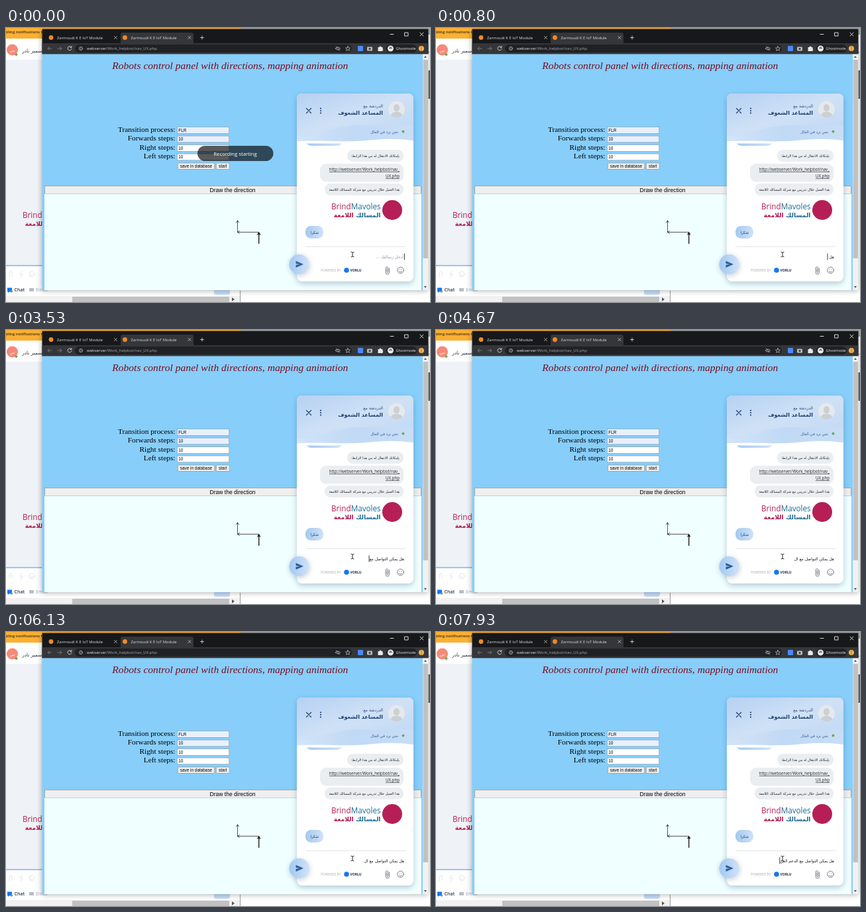
An HTML page for the animation above (8000 ms loop, 640x414 px).

```html
<!DOCTYPE html>
<html lang="en">
<head>
<meta charset="utf-8">
<title>Control panel with chat</title>
<style>
html, body { margin: 0; width: 100%; height: 100%; overflow: hidden; background: #fff; }
svg { display: block; width: 100%; height: 100%; }
text { font-family: "Open Sans", sans-serif; white-space: pre; }
.ar { font-family: "DejaVu Sans", sans-serif; direction: rtl; }
.serif { font-family: "Liberation Serif", serif; }
.arial { font-family: "Liberation Sans", sans-serif; }
.end { text-anchor: end; }
.mid { text-anchor: middle; }
.line { fill: none; stroke-linecap: round; stroke-linejoin: round; }
</style>
</head>
<body>
<svg viewBox="0 0 640 414" xmlns="http://www.w3.org/2000/svg">
<defs>
  <linearGradient id="head" x1="0" y1="0" x2="1" y2="1">
    <stop offset="0" stop-color="#b5d1f2"/><stop offset=".5" stop-color="#cfe1f6"/><stop offset="1" stop-color="#bfd8f4"/>
  </linearGradient>
  <linearGradient id="wave" x1="0" x2="1">
    <stop offset="0" stop-color="#d3e4f8"/><stop offset=".5" stop-color="#c0d9f5"/><stop offset="1" stop-color="#c8def6"/>
  </linearGradient>
  <linearGradient id="blue" x1="0" x2="1">
    <stop offset="0" stop-color="#a3c9f1"/><stop offset="1" stop-color="#cfe2f7"/>
  </linearGradient>
  <filter id="soft" x="-20%" y="-20%" width="140%" height="140%"><feGaussianBlur stdDeviation="4"/></filter>
  <clipPath id="card"><rect x="439" y="99" width="176" height="284" rx="8"/></clipPath>
  <clipPath id="face"><circle cx="589.5" cy="123" r="12.5"/></clipPath>
  <g id="brand">
    <text y="0" font-size="11.7" fill="#b51f55">Brind<tspan fill="#1f6c93">Mavoles</tspan></text>
    <text class="ar" x="74.500" y="12" font-size="9.200" font-weight="bold" fill="#1f6c93">المسالك <tspan fill="#b3164f">اللامعة</tspan></text>
  </g>
  <g id="tab">
    <circle cx="68" cy="14.500" r="3.400" fill="#f08a24"/>
    <text x="77" y="16.800" font-size="5.900" fill="#dfe1e5">Zarmoudi K E IoT Module</text>
    <path class="line" d="M163.500 12.500l4 4m0-4l-4 4" stroke="#c8cacd" stroke-width=".8"/>
  </g>
</defs>

<!-- window behind -->
<rect width="640" height="414" fill="#fff"/>
<rect width="354" height="16" fill="#fbb034"/>
<text x="-1" y="8" font-size="6" font-weight="600" fill="#3a2c12">bling notifications t</text>
<circle cx="9.500" cy="33" r="8.500" fill="#f58a78"/>
<text class="ar mid" x="9.500" y="35.500" font-size="6" fill="#fff">س</text>
<circle cx="15.500" cy="40" r="2" fill="#5fb04b"/>
<text class="ar" x="54.500" y="36.500" font-size="7.400" fill="#2b313b">سمير نادر</text>
<rect y="48" width="56" height="310" fill="#eff2f6"/>
<use href="#brand" x="25" y="286.500"/>
<path d="M0 359H56" stroke="#3a86f2"/>
<g class="line" stroke="#e1e6ee" stroke-width="1">
  <path d="M5 376v-6a2 2 0 0 1 4 0v5M24 367l-3 5h4l-3 5"/>
  <circle cx="39" cy="372" r="4"/><path d="M37 373q2 2 4 0"/>
</g>
<path d="M2 392.500h7v6H5l-2 1.500v-1.500H2z" fill="#1676f3"/>
<circle cx="8.500" cy="398" r="1.700" fill="#5fb04b"/>
<text x="12.500" y="398" font-size="7" font-weight="600" fill="#303b50">Chat</text>
<rect x="35" y="393" width="7" height="5" rx="1" fill="#b7bec9"/>
<text x="45" y="398" font-size="7" fill="#969faf">Email</text>
<rect x="314" y="390" width="24" height="13" rx="3" fill="#c3dcfa"/>
<rect y="405" width="354" height="9" fill="#f1f1f1"/>
<rect x="100" y="406" width="237" height="8" fill="#c1c1c1"/>
<path d="M341 407l4 3-4 3z" fill="#555"/>
<path d="M353.500 397V414" stroke="#999"/>
<rect x="354" width="286" height="10" fill="#a9a9a9"/>
<rect x="637" y="64" width="3" height="43" fill="#63666b"/>
<path d="M637 36.500h3" stroke="#aaa"/>

<!-- browser -->
<rect x="54" y="4" width="583.500" height="393" fill="#000" opacity=".3" filter="url(#soft)"/>
<rect x="54.500" y="1.500" width="583" height="38" fill="#17181a"/>
<path d="M173 24V10q0-3 3-3H280q3 0 3 3V24z" fill="#35363a"/>
<use href="#tab"/><use href="#tab" x="111.500"/>
<path class="line" d="M293.500 14.500h5m-2.500-2.500v5" stroke="#d2d4d7" stroke-width=".9"/>
<g class="line" stroke="#eee" stroke-width=".9">
  <path d="M580 9.500h5M625 7l5 5m0-5l-5 5"/><rect x="602" y="7" width="5" height="5"/>
</g>
<rect x="54.500" y="23" width="583" height="16.500" fill="#35363a"/>
<rect x="104" y="25" width="418" height="12" rx="6" fill="#202124"/>
<g class="line" stroke="#c9cbcf" stroke-width="1">
  <path d="M69 31h-6m2.500-2.500L63 31l2.500 2.500" stroke="#77797d"/>
  <path d="M78 31h6m-2.500-2.500L84 31l-2.500 2.500" stroke="#77797d"/>
  <path d="M98.500 29a3 3 0 1 0 .5 2.500M99 27.500v2h-2"/>
  <circle cx="113" cy="31" r="2.600" stroke-width=".7"/><path d="M113 30.800v1.300m0-2.700v.1" stroke-width=".8"/>
  <path d="M497.500 31q3.500-4 7 0q-3.500 4-7 0zM498.500 28l5 6" stroke-width=".8"/>
  <path d="M516 27.500l1 2.500 2.600.1-2 1.700.7 2.600-2.300-1.500-2.300 1.500.7-2.600-2-1.700 2.600-.1z" stroke-width=".7"/>
</g>
<text x="122" y="33.300" font-size="6" fill="#e4e6e9">webserver<tspan fill="#a9acb1">/Work_helpbot/nav_UX.php</tspan></text>
<rect x="531" y="27" width="8" height="8" rx="1" fill="#4a8af4"/>
<rect x="545" y="28.500" width="8" height="6" rx="1" fill="#b8bbbf"/><circle cx="549" cy="31.500" r="1.500" fill="#35363a"/>
<path d="M561.500 29h2a1.500 1.500 0 0 1 3 0h2v2.200a1.500 1.500 0 0 1 0 2.600V35h-7z" fill="#e7e8ea"/>
<rect x="574" y="25" width="46" height="12" rx="6" fill="#202124"/>
<circle cx="580.500" cy="31" r="4.500" fill="#e5e7e9"/>
<path d="M578 30.500h5m-4-1.500h3" stroke="#33353a" stroke-width=".8"/>
<text x="588.500" y="33.200" font-size="5.500" fill="#eee">Ghostmode</text>
<circle cx="627" cy="31" r="4" fill="#f0b450"/>
<g fill="#5a4520"><circle cx="627" cy="28.800" r=".6"/><circle cx="627" cy="31" r=".6"/><circle cx="627" cy="33.200" r=".6"/></g>

<!-- page -->
<rect x="54.500" y="39.500" width="575" height="356.500" fill="#87cefa"/>
<rect x="629" y="39.500" width="8.500" height="356.500" fill="#f1f1f1"/>
<rect x="629.500" y="48" width="7.500" height="300" fill="#c1c1c1"/>
<path d="M631 45l2-3 2 3zM631 390l2 3 2-3z" fill="#555"/>
<text class="serif mid" x="338.300" y="61.600" font-size="15.600" font-style="italic" fill="#7b0d1e">Robots control panel with directions, mapping animation</text>
<g id="form"></g>
<g class="arial" fill="#efefef" stroke="#858585" stroke-width=".6">
  <rect x="259.300" y="204" width="55.500" height="9.500" rx="1"/>
  <rect x="317.300" y="204" width="20" height="9.500" rx="1"/>
  <rect x="58.500" y="238.800" width="568" height="11.500"/>
</g>
<text class="arial mid" x="287" y="210.800" font-size="6.400">save in database</text>
<text class="arial mid" x="327.300" y="210.800" font-size="6.400">start</text>
<text class="arial mid" x="342" y="247.700" font-size="8.550">Draw the direction</text>
<rect x="58" y="250.500" width="569" height="145.500" fill="#f0ffff"/>
<g class="line" stroke="#111" stroke-width=".7">
  <path d="M349.500 308.500V291m-2 3l2-3 2 3M381.500 308.500H349.500m3-2l-3 2 3 2"/>
  <path d="M381.700 325.500V309m-1.800 3l1.800-3 1.800 3" stroke-width="1.300"/>
</g>
<g id="toast">
  <rect x="289" y="178" width="114.500" height="23" rx="11.500" fill="#000" opacity=".65"/>
  <text class="mid" x="346" y="192.500" font-size="7.700" fill="#fff">Recording starting</text>
</g>

<!-- chat card -->
<rect x="439" y="102" width="176" height="284" rx="8" fill="#143a66" opacity=".28" filter="url(#soft)"/>
<g clip-path="url(#card)">
  <rect x="439" y="99" width="176" height="284" fill="#fff"/>
  <path d="M439 99H615V170Q585 166 555 169T500 171T439 171z" fill="url(#wave)"/>
  <path d="M439 99H615V147H540Q505 147 480 157T439 163z" fill="url(#head)"/>
</g>
<path class="line" d="M453.500 121.500l7 7m0-7l-7 7" stroke="#1c3f72" stroke-width="1.200"/>
<g fill="#1c3f72"><circle cx="475" cy="121.500" r="1.100"/><circle cx="475" cy="125" r="1.100"/><circle cx="475" cy="128.500" r="1.100"/></g>
<circle cx="589.500" cy="123" r="12.500" fill="#e6e9ec"/>
<g clip-path="url(#face)" fill="#cbd0d4"><ellipse cx="589.500" cy="120.500" rx="4.500" ry="5.500"/><ellipse cx="589.500" cy="133" rx="9" ry="6.500"/></g>
<text class="ar" x="569" y="119.500" font-size="6.200" fill="#26477a">الدردشة مع</text>
<text class="ar" x="569" y="131" font-size="8" font-weight="bold" fill="#1c3f72">المساعد الشغوف</text>
<text class="ar" x="592" y="158.500" font-size="5.600" fill="#2d5590">نحن نرد في الحال</text>
<circle cx="599.500" cy="156.500" r="1.900" fill="#6aa84f"/>
<path d="M454 174.500H507Q504 178 498 178H462Q457 178 454 174.500z" fill="url(#blue)"/>
<g fill="#ebeef0">
  <rect x="515" y="184" width="85" height="18" rx="8.500"/>
  <rect x="474" y="205" width="126" height="27.500" rx="9"/>
  <rect x="481" y="235" width="119" height="18" rx="8.500"/>
</g>
<text class="ar" x="594" y="195" font-size="5.200" fill="#20242b">بإمكانك الانتقال له من هذا الرابط:</text>
<g class="end" font-size="6.200" fill="#20242b" text-decoration="underline">
  <text x="594" y="216">http://webserver/Work_helpbot/nav_</text>
  <text x="594" y="226">UX.php</text>
</g>
<text class="ar" x="594" y="246" font-size="5.250" fill="#20242b">هذا العمل خلال تدريبي مع شركة المسالك اللامعة</text>
<use href="#brand" x="491" y="273.500"/>
<circle cx="583" cy="275" r="15" fill="#b51f55"/>
<rect x="452" y="299" width="27" height="19" rx="8.500" fill="url(#blue)"/>
<text class="ar" x="472" y="310.500" font-size="5.700" fill="#1c3f72">شكرا</text>
<path d="M453 330.500H603" stroke="#dfe2e6"/>
<text class="ar" id="hint" x="600" y="348" font-size="6.200" fill="#8b9098">أدخل رسالتك ...</text>
<text class="ar" id="typed" x="601" y="348" font-size="6" fill="#15181d"></text>
<rect id="caret" y="340.500" width=".8" height="10" fill="#111"/>
<circle cx="443" cy="359" r="15" fill="#143a66" opacity=".25" filter="url(#soft)"/>
<circle cx="442.500" cy="357" r="15" fill="url(#blue)"/>
<path d="M437.500 352l11.500 5-11.500 5v-3.900l6-1.100-6-1.100z" fill="#2d5c9e"/>
<text x="475" y="368" font-size="4.900" fill="#a3a9b3">POWERED BY</text>
<circle cx="514" cy="366" r="3.800" fill="#1676f3"/>
<text x="519.500" y="368" font-size="5" font-weight="bold" fill="#1b2b4a">VORLU</text>
<g class="line" stroke="#6c727c" stroke-width=".9">
  <path d="M578.500 363v6.500a2.700 2.700 0 0 1-5.400 0v-6.800a1.800 1.800 0 0 1 3.600 0v6a.9.900 0 0 1-1.800 0v-5"/>
  <circle cx="595.500" cy="366" r="4.800"/><path d="M593 367.500q2.500 3 5 0M593.800 364.500v.2m3.400-.2v.2"/>
</g>
<g class="line" stroke="#111" stroke-width=".9"><path d="M521 338.500q2 0 2 1.200v5q0 1.200-2 1.200M525 338.500q-2 0-2 1.200m0 5q0 1.200 2 1.200"/></g>
</svg>

<script>
const LOOP = 8000, BLINK = 530, RIGHT = 601;
const MESSAGE = "هل يمكن التواصل مع الدعم الفن";
const KEYS = [330, 530, 730, 1000, 1130, 1260, 1400, 1600, 1800, 1930, 2070, 2270, 2400, 2530, 2600,
  2800, 3000, 3270, 3670, 3870, 4130, 6870, 6930, 7070, 7200, 7400, 7530, 7730, 7870];
const $ = id => document.getElementById(id);
const [toast, hint, typed, caret] = ["toast", "hint", "typed", "caret"].map($);

const fields = [["Transition process:", "FLR"], ["Forwards steps:", 10], ["Right steps:", 10], ["Left steps:", 10]];
$("form").innerHTML = fields.map(([label, value], i) => {
  const y = 149.6 + i * 13.5;
  return `<text class="serif end" x="255.500" y="${y + 7}" font-size="11.400">${label}</text>
    <rect x="258.300" y="${y}" width="78.500" height="9.700" fill="${i < 2 ? "#e8f0fe" : "#fff"}" stroke="#8a949e" stroke-width=".6"/>
    <text class="arial" x="260.300" y="${y + 7.2}" font-size="6.400">${value}</text>`;
}).join("");

const start = performance.now();
let shown = -1;

function draw() {
  const t = (performance.now() - start) % LOOP;
  const count = KEYS.filter(k => k <= t).length;
  if (count !== shown) {
    shown = count;
    typed.textContent = MESSAGE.slice(0, count);
    const width = count ? typed.getComputedTextLength() + 0.8 : 0;
    hint.style.display = count ? "none" : "";
    caret.setAttribute("x", RIGHT - width);
  }
  const idle = t - (count ? KEYS[count - 1] : 0);
  caret.style.opacity = Math.floor(idle / BLINK) % 2 ? 0 : 1;
  toast.style.opacity = Math.max(0, Math.min(1, 1 - (t - 70) / 400));
  requestAnimationFrame(draw);
}
draw();
</script>
</body>
</html>
```
